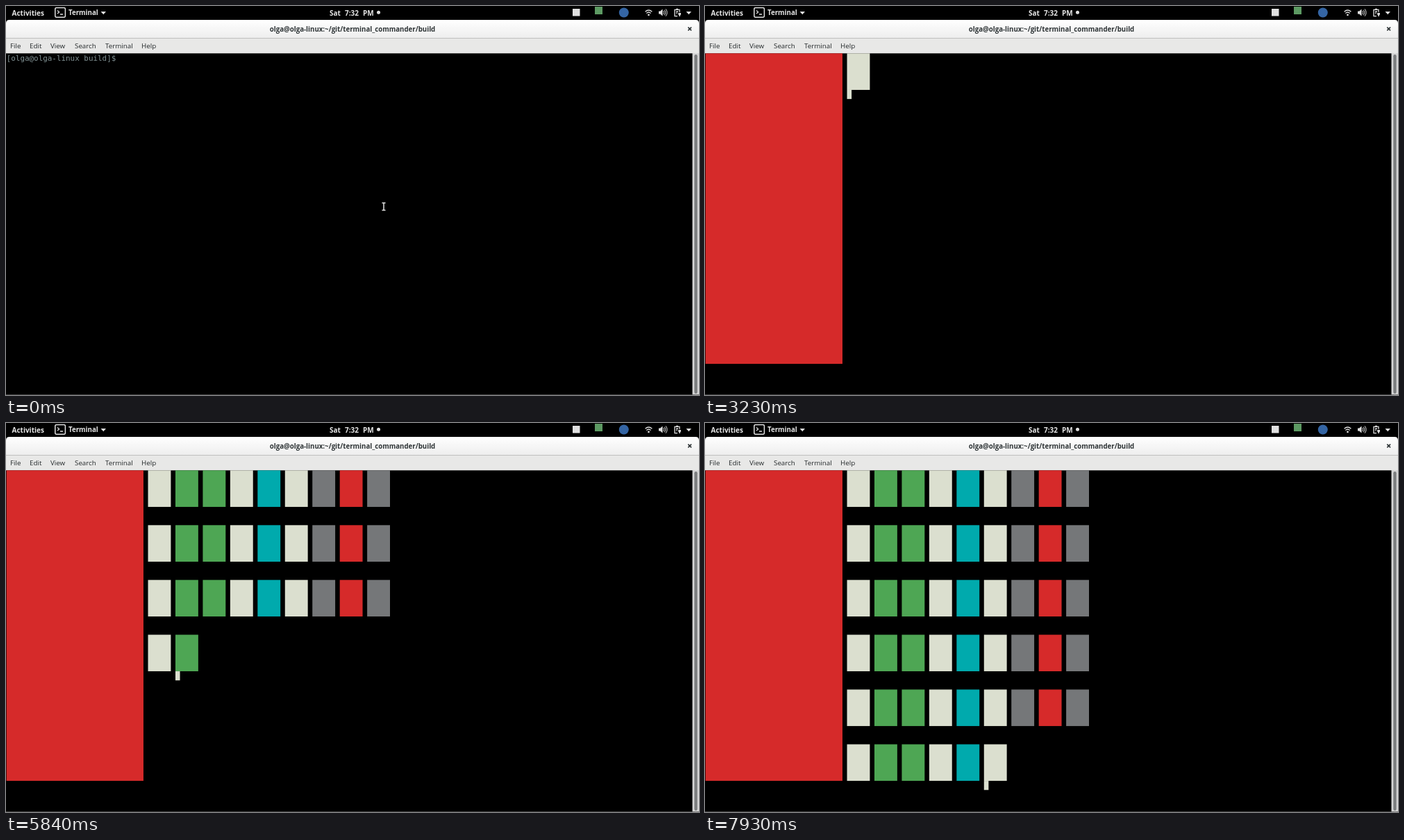
Animation of 998x561 px, one loop 8 s. Source, as an HTML page:

```html
<!DOCTYPE html>
<html lang="en">
<head>
<meta charset="utf-8">
<title>Terminal</title>
<style>
  html, body { margin: 0; width: 100%; height: 100%; overflow: hidden; background: #000; }
  svg { display: block; width: 998px; height: 561px; }
  text { white-space: pre; }
  .bar, .title { font: bold 10px "Open Sans", "Noto Sans", sans-serif; fill: #e6e6e6; }
  .title { font-size: 9.7px; fill: #2e3436; text-anchor: middle; }
  .menu { font: 9.8px "Open Sans", "Noto Sans", sans-serif; fill: #24292b; }
  .shell { font: 10.92px "DejaVu Sans Mono", "Liberation Mono", monospace; fill: #839496; }
  .line { fill: none; stroke: #e0e0e0; stroke-width: 1.3; }
  .icon { fill: #e0e0e0; }
</style>
</head>
<body>
<svg viewBox="0 0 998 561">
  <defs>
    <linearGradient id="head" x2="0" y2="1">
      <stop stop-color="#fff"/>
      <stop offset="1" stop-color="#ededed"/>
    </linearGradient>
  </defs>
  <rect width="998" height="561"/>

  <!-- top panel -->
  <g class="bar">
    <text x="8.5" y="13.5">Activities</text>
    <text x="90" y="13" font-size="9.7" style="font-size:9.7px">Terminal</text>
    <text x="466" y="13.5">Sat</text>
    <text x="488" y="13.5">7:32</text>
    <text x="514" y="13.5">PM</text>
  </g>
  <rect class="line" x="70.8" y="2.6" width="14.6" height="13.6" rx="2" style="stroke-width:1.5"/>
  <path class="line" d="M74 6.5l2.6 2.3-2.6 2.3M78 12h4"/>
  <path class="icon" d="M136.5 8h7.5l-3.75 4.2zM979.5 8h7.5l-3.75 4.2z"/>
  <circle class="icon" cx="536.5" cy="9.3" r="2.5"/>
  <rect class="icon" x="816" y="4" width="10.5" height="10.5"/>
  <rect x="848" y="1" width="11" height="11" fill="#5d9a63"/>
  <circle cx="889.8" cy="9.5" r="7" fill="#3465a4"/>
  <path class="line" d="M920.6 8.2q4.9-4.4 9.8 0M922.4 10.4q3.1-2.8 6.2 0"/>
  <circle class="icon" cx="925.5" cy="12.8" r="1.4"/>
  <path class="icon" d="M940 7.5h2.2l3.3-3v10l-3.3-3H940z"/>
  <path class="line" d="M946.8 7.2q1.6 2.3 0 4.6M948.5 5.7q2.8 3.8 0 7.6M950.2 4.3q3.8 5.2 0 10.4" style="stroke-width:1"/>
  <path class="line" d="M970 9V5.3h-7v9.4h4M965 4.4h3M965 8h3M965 10.2h2"/>
  <path class="icon" d="M968.2 10h3.8v2.2l-1.2 1.3v1.6h-1.4v-1.6l-1.2-1.3z"/>

  <!-- window frame -->
  <path d="M0 47V25q0-5 5-5h988q5 0 5 5v22z" fill="url(#head)"/>
  <rect y="46" width="998" height="1" fill="#bfbfbf"/>
  <rect y="47" width="998" height="21.3" fill="#e8e8e7"/>
  <text class="title" x="499" y="37">olga@olga-linux:~/git/terminal_commander/build</text>
  <path d="M982.3 30.6l4.8 4.8M987.1 30.6l-4.8 4.8" stroke="#2e3436" stroke-width="1.6"/>
  <g class="menu">
    <text x="6" y="61.3">File</text>
    <text x="34" y="61.3">Edit</text>
    <text x="64" y="61.3">View</text>
    <text x="99" y="61.3">Search</text>
    <text x="143" y="61.3">Terminal</text>
    <text x="195" y="61.3">Help</text>
  </g>
  <rect x="988.5" y="68" width="9.5" height="493" fill="#d6d6d6"/>
  <rect x="991.3" y="70" width="4.4" height="489" rx="2.2" fill="#7b7d7e"/>
  <rect y="560.3" width="998" height=".7" fill="#555"/>

  <!-- terminal -->
  <g id="board"></g>
  <rect id="caret"/>
  <text id="shell" class="shell" x="0.7" y="79"></text>
  <path id="beam" d="M541.5 284h2l.5.5.5-.5h2M541.5 294.500h2l.5-.5.5.5h2M544 284.500v9.500" fill="none" stroke="#e4e4e4" stroke-width="1.5"/>
</svg>
<script>
const LOOP = 8000, RUN = 3010;
const CELL_W = 6.575, CELL_H = 13.17, LEFT = 0.7, TOP = 68.3;
const PROMPT = '[olga@olga-linux build]$ ';
const LIGHT = '#dbdfcf', GREEN = '#4ea654', CYAN = '#00aaad', GREY = '#757779', RED = '#d62a2a';
const COLORS = [LIGHT, GREEN, GREEN, LIGHT, CYAN, LIGHT, GREY, RED, GREY];
// first card time, last card time, card count
const ROWS = [[3160, 3910, 9], [4010, 4760, 9], [4870, 5660, 9],
              [5740, 6530, 9], [6610, 7360, 9], [7480, 7930, 6]];

const $ = id => document.getElementById(id);
const board = $('board'), caret = $('caret'), shell = $('shell'), beam = $('beam');
const show = (el, on) => el.setAttribute('visibility', on ? 'visible' : 'hidden');

function place(el, col, row, cols, rows, fill) {
  const box = { x: LEFT + col * CELL_W, y: TOP + row * CELL_H,
                width: cols * CELL_W, height: rows * CELL_H, fill };
  for (const key in box) el.setAttribute(key, box[key]);
}

function addBlock(at, col, row, cols, rows, fill) {
  const el = document.createElementNS('http://www.w3.org/2000/svg', 'rect');
  place(el, col, row, cols, rows, fill);
  board.append(el);
  return { el, at, col, end: row + rows };
}

const blocks = [addBlock(RUN, 0, 0, 30, 34, RED)];
ROWS.forEach(([from, to, count], r) => {
  for (let i = 0; i < count; i++) {
    const at = from + Math.floor((to - from) * i / (count - 1) / 10) * 10;
    blocks.push(addBlock(at, 31 + 6 * i, 6 * r, 5, 4, COLORS[i]));
  }
});

function command(t) {
  if (t < 2040) return '';
  return t < 2660 ? 'clear' : 'ninja && ./unit_test';
}

function caretOn(t) {
  if (t < 2040) return Math.floor((t + 115) / 585) % 2 === 1;
  return t < RUN || Math.floor((t - 2960) / 584) % 2 === 0;
}

function draw(t) {
  const running = t >= RUN;
  const line = running ? '' : PROMPT + command(t);
  if (shell.textContent !== line) shell.textContent = line;
  show(beam, t < 2080);

  let last;
  for (const b of blocks) {
    show(b.el, t >= b.at);
    if (t >= b.at) last = b;
  }
  if (running) place(caret, last.col, last.end, 1, 1, LIGHT);
  else place(caret, line.length, 0, 1, 1, '#8c9c9d');
  show(caret, caretOn(t));
}

const start = performance.now();
function tick(now) {
  draw(Math.max(0, now - start) % LOOP);
  requestAnimationFrame(tick);
}
draw(0);
requestAnimationFrame(tick);
</script>
</body>
</html>
```
